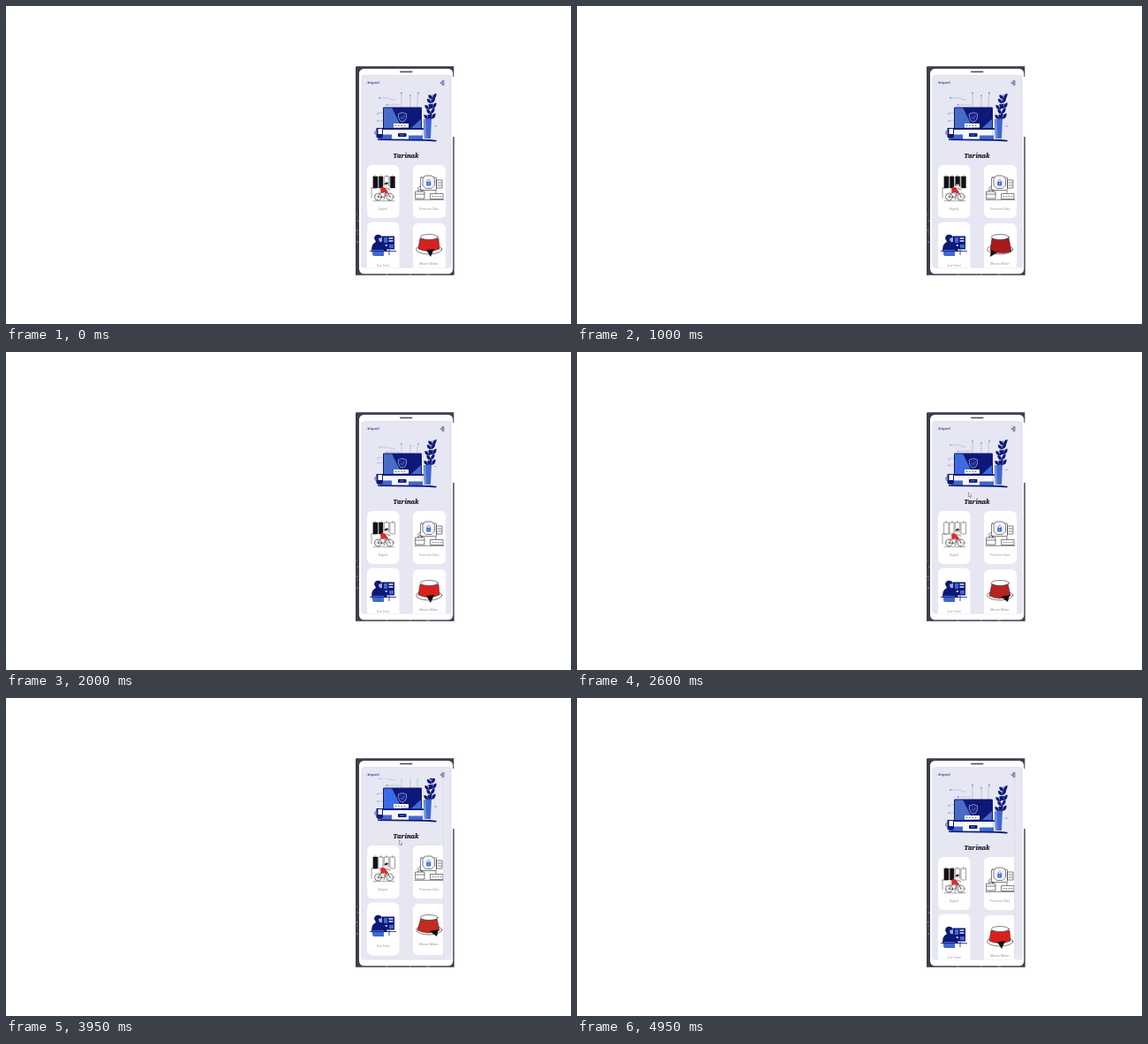
Write an HTML page that moves like this. It is 640x360 px and loops after 5 s.

```html
<!DOCTYPE html>
<html lang="en">
<head>
<meta charset="utf-8">
<title>Phone app</title>
<style>
html, body { margin: 0; width: 100%; height: 100%; overflow: hidden; background: #fff; }
svg { display: block; width: 100vw; height: 100vh; }
.anim { animation: 5s linear infinite; }
.title { font: italic 700 7px "Noto Serif", serif; fill: #15151d; stroke: #15151d; stroke-width: .2; text-anchor: middle; }
.hello { font: italic 700 4.3px "Liberation Serif", serif; fill: #34418c; }
.label { font: 3.5px Roboto, sans-serif; fill: #9a9aa2; text-anchor: middle; }
.card { fill: #fff; }
.ink { fill: none; stroke: #2b2b33; stroke-width: .6; stroke-linejoin: round; stroke-linecap: round; }
.paper { fill: #fff; }
.wire { fill: none; stroke: #959cbe; stroke-width: .5; }
.dot { fill: #8793c8; }
.navy { fill: #0d1878; }
.blue { fill: #4168cd; }

#page { animation-name: scroll; }
#bar { animation-name: bar; }
#cursor { animation-name: cursor; }
#wires { animation-name: grow; transform-origin: 452px 116px; }
#sheen { animation-name: sheen; }
.box { animation-timing-function: step-end; }
.b1 { animation-name: box1; } .b2 { animation-name: box2; }
.b3 { animation-name: box3; } .b4 { animation-name: box4; }
.spin { animation: spin 1.25s linear infinite; transform-box: fill-box; transform-origin: center; }
#rider { animation-name: bob; }
#crown { animation-name: crown; }
#tassel { animation-name: tassel; }

@keyframes scroll {
  0%, 56% { transform: none; animation-timing-function: ease-in-out; }
  64%, 87% { transform: translateY(-13px); animation-timing-function: ease-in-out; }
  95%, 100% { transform: none; }
}
@keyframes bar { 0%, 55% { opacity: 0; } 58%, 99% { opacity: 1; } 100% { opacity: 0; } }
@keyframes cursor {
  0%, 45% { opacity: 0; transform: translate(-3px, -4px); }
  48%, 54% { opacity: 1; transform: none; }
  64%, 88% { opacity: 1; transform: translate(2px, 2px); }
  94%, 100% { opacity: 0; transform: translate(2px, 2px); }
}
@keyframes grow {
  0%, 20%, 66%, 100% { transform: none; }
  40% { transform: scaleY(.68); }
  52% { transform: scaleY(.88); }
}
@keyframes sheen { 0%, 40%, 99%, 100% { fill: #496bc8; } 55%, 85% { fill: #3c6be6; } }
@keyframes box1 { 0% { opacity: 1; } 48% { opacity: 0; } 62%, 100% { opacity: 1; } }
@keyframes box2 { 0% { opacity: 1; } 45% { opacity: 0; } 86%, 100% { opacity: 1; } }
@keyframes box3 { 0% { opacity: 0; } 8% { opacity: 1; } 34%, 100% { opacity: 0; } }
@keyframes box4 { 0% { opacity: 1; } 38%, 100% { opacity: 0; } }
@keyframes spin { to { transform: rotate(360deg); } }
@keyframes bob {
  0%, 20%, 40%, 60%, 80%, 100% { transform: none; }
  10%, 30%, 50%, 70%, 90% { transform: translateY(.5px); }
}
@keyframes crown {
  0%, 40%, 97%, 100% { d: path("M469 263Q479 266 490 263L491 275Q479 280 467 275Z"); fill: #d8211d; }
  20% { d: path("M470 263Q479 267 489 262L492 278Q480 282 468 277Z"); fill: #a9191c; }
  52% { d: path("M470 262Q479 266 488 262L491 276Q479 282 467 276Z"); fill: #b7251f; }
  69%, 79% { d: path("M470 262Q479 266 488 262L491 276Q479 282 466 276Z"); fill: #c42b22; }
}
@keyframes tassel {
  0%, 40%, 97%, 100% { d: path("M476 276L485 275L481 284Z"); }
  20% { d: path("M469 276L476 279L468 284Z"); }
  52%, 79% { d: path("M480 277L490 275L488 283Z"); }
}
</style>
</head>
<body>
<svg viewBox="0 0 640 360">
  <defs>
    <clipPath id="view"><rect x="403" y="91" width="101" height="204.5"/></clipPath>
    <clipPath id="screen"><rect x="428" y="115.5" width="42" height="23"/></clipPath>
    <g id="wheel">
      <circle class="ink paper" r="4"/>
      <path class="spin ink" style="stroke-width:.25" d="M-4 0H4M0-4V4"/>
    </g>
    <path id="leaf" class="navy" d="M0 0Q-5 0-4.6-5Q0-5 0 0Q5-1 4.6-6.5Q0-6 0 0Z"/>
  </defs>

  <!-- phone body -->
  <path fill="#3b3e4c" d="M397 68.3H507.3V80H506V148H507.7V304.7H396V69Z"/>
  <rect x="400" y="71" width="106.3" height="232.3" rx="5.5" fill="#fff"/>
  <rect x="402.8" y="78.5" width="101.4" height="217.5" rx="3" fill="#e6e7f3" stroke="#cfd0dd" stroke-width=".5"/>
  <rect x="446" y="73.7" width="14.5" height="1.5" rx=".7" fill="#4a4a50"/>
  <path d="M397 236h1M398 243h1.5M396.5 254h2M397.5 258h1M397 267h2M430 304h3M457 304h2M476 304h4" stroke="#aeb3c3" stroke-width=".8"/>

  <g clip-path="url(#view)">
    <g id="page" class="anim">
      <!-- laptop scene -->
      <g id="wires" class="anim">
        <path class="wire" d="M448 115V99M458 115V102M466 115V106L467 99M446 112H432M441 106H436L434 104H423"/>
        <path class="wire" d="M427 121H421M427 130H421M484 136H487"/>
        <g class="dot">
          <circle cx="448" cy="98.5" r="1"/><circle cx="458" cy="101.5" r="1"/>
          <circle cx="467" cy="98.5" r="1"/><circle cx="431.5" cy="112" r=".9"/>
          <circle cx="423" cy="104" r=".9"/><circle cx="421" cy="122" r=".8"/>
          <circle cx="421" cy="130" r=".8"/><circle cx="487" cy="136" r=".8"/>
        </g>
      </g>
      <path class="wire" d="M478 129Q479 114 483 100" style="stroke:#0d1878"/>
      <use href="#leaf" x="478" y="128"/><use href="#leaf" x="482" y="128"/>
      <use href="#leaf" x="481" y="122"/><use href="#leaf" x="479" y="117"/>
      <use href="#leaf" x="483" y="116"/><use href="#leaf" x="481.5" y="110"/>
      <use href="#leaf" x="483" y="105.5"/>
      <path class="blue" d="M473 128H482L481 150H474Z"/>
      <path fill="#6d8be0" d="M473 128H475.5L476.5 150H474Z"/>
      <rect class="navy" x="427" y="114.5" width="44" height="25" rx="1.3"/>
      <g clip-path="url(#screen)">
        <path id="sheen" class="anim" d="M428 115H437L449 139H428ZM470 128V139H458Z"/>
      </g>
      <path fill="#17258b" stroke="#c5cef4" stroke-width=".6" d="M449 120.5L453.6 122V126Q453 130 449 131.5Q445 130 444.4 126V122Z"/>
      <path d="M447 126L448.6 127.7L451.5 124" fill="none" stroke="#acbafa" stroke-width=".5"/>
      <rect x="439" y="133" width="17" height="4.6" fill="#fff"/>
      <path d="M441 135.4H454" stroke="#30377a" stroke-width="1" stroke-dasharray="1.3 2"/>
      <path class="navy" d="M424 138.3H473V140H424Z"/>
      <path fill="#f7f8ff" d="M427 140H470V150H427Z"/>
      <path class="blue" d="M424 145.5H437V151H424ZM456 146.5H472V151H456Z"/>
      <rect class="navy" x="444" y="144" width="9.5" height="4" rx=".7"/>
      <path d="M446 146H451" stroke="#91a8ef" stroke-width=".7"/>
      <path class="navy" d="M419.5 138H427V148Q426 150 423 150Q420 150 419.5 148Z"/>
      <path fill="#fff" d="M421.5 139H426V145H421.5Z"/>
      <path d="M419.5 141Q416 143 419.5 146" fill="none" stroke="#0d1878" stroke-width=".8"/>
      <path class="navy" d="M421 150.6L480 151L488 152L487 153.4L476 152.8L421 152Z"/>

      <text class="title" x="453" y="172">Tarinak</text>

      <rect class="card" x="409" y="180" width="36.5" height="60" rx="6"/>
      <rect class="card" x="461" y="180" width="37" height="60" rx="6"/>
      <rect class="card" x="409" y="244.5" width="36.5" height="60" rx="6"/>
      <rect class="card" x="461" y="246" width="37" height="58" rx="6"/>

      <!-- cyclist -->
      <g class="ink" style="stroke-width:.45">
        <path d="M416 193H421V206H416ZM422.3 193H427V206H422.3ZM428.7 193H433.7V206H428.7ZM435.3 193H440.5V206H435.3Z"/>
        <path d="M418 193V191.5M425 193V191.5M431 193V191.5M438 193V191.5M414 206V217M414 206H419"/>
      </g>
      <g fill="#111116">
        <rect class="anim box b1" x="416" y="193" width="5" height="13"/>
        <rect class="anim box b2" x="422.3" y="193" width="4.7" height="13"/>
        <rect class="anim box b3" x="428.7" y="193" width="5" height="13"/>
        <rect class="anim box b4" x="435.3" y="193" width="5.2" height="13"/>
      </g>
      <path class="ink" style="stroke-width:.4" d="M416 220.7H440"/>
      <use href="#wheel" x="421.5" y="216"/><use href="#wheel" x="434.8" y="216"/>
      <path class="ink" d="M421.5 216L425 210H432L428 216ZM432 210L434.8 216M431 207H434"/>
      <g id="rider" class="anim">
        <path fill="#fff" d="M427 204L432 203L436 207L431 208Z"/>
        <path fill="#d72d2a" d="M424 207L426 204.5L430 206L432.5 211L430.5 213L428 210.5L425 212.5Z"/>
        <path class="ink" d="M427 211L430 214L428 219M431 206L435 208"/>
        <circle cx="431" cy="202.3" r="1.6" fill="#f1c5b0"/>
        <path fill="#17171c" d="M428.7 202Q429 199 432 199.5L433.4 201L430.4 202Z"/>
      </g>
      <text class="label" x="427" y="231">Digital</text>

      <!-- secure workplace -->
      <g class="ink">
        <rect class="paper" x="469.5" y="194" width="18" height="14.5" rx="1"/>
        <path fill="#f1f3fc" d="M475.5 192H482L485.5 195.5V203L482 206.5H475.5L472 203V195.5Z"/>
        <rect class="paper" x="488" y="197" width="6" height="9"/>
        <path d="M489 200H493M489 203H493M466 207L469 204M471 209V213M487 209V212"/>
        <rect class="paper" x="464" y="210" width="10" height="8"/>
        <path d="M464 213H474M467 210V208H471V210M463 219.3H496"/>
        <rect class="paper" x="481" y="212.5" width="14" height="6"/>
        <path d="M483 215.5H493" stroke-dasharray="1 2"/>
      </g>
      <path d="M477 199.5V198Q478.8 195 480.5 198V199.5" fill="none" stroke="#3d63bd" stroke-width=".8"/>
      <rect x="476.2" y="199" width="5" height="4.4" rx=".7" fill="#426fce"/>
      <circle cx="478.7" cy="201.1" r=".6" fill="#fff"/>
      <text class="label" x="479.3" y="231">Premium Data</text>

      <!-- desk worker -->
      <rect class="navy" x="426" y="260.5" width="14" height="15"/>
      <path class="blue" d="M428 262H432V268H428ZM434 270H439V274H434Z"/>
      <path d="M433.5 263H438.5M433.5 266H438.5M428 271H432" stroke="#e6eaff" stroke-width="1.4"/>
      <path class="navy" d="M414 277Q414 269 419 267L417 263Q418 258 423 259Q427 260 426 265L429 269L432 278H414Z"/>
      <path fill="#9aabdf" d="M422 263L426 262L426 267Q422 268 422 263Z"/>
      <path class="blue" d="M415 276H428V283H417Q415 283 415 280Z"/>
      <path d="M412 277.5H442M434 276V282" stroke="#0d1878" stroke-width=".8"/>
      <text class="label" x="427" y="295">Live Feed</text>

      <!-- hat -->
      <ellipse class="ink paper" cx="479.2" cy="275.5" rx="14.6" ry="5.5"/>
      <path id="crown" class="anim" d="M469 263Q479 266 490 263L491 275Q479 280 467 275Z" stroke="#34191a" stroke-width=".5"/>
      <ellipse class="ink paper" cx="479.3" cy="261.5" rx="10" ry="3"/>
      <path id="tassel" class="anim" fill="#111116" d="M476 276L485 275L481 284Z"/>
      <text class="label" x="479" y="293">Master Maker</text>
    </g>
    <g id="bar" class="anim">
      <rect x="495.5" y="91" width="3" height="204.5" fill="#e9eaf4"/>
      <path d="M495.8 91V296" stroke="#cfd0dc" stroke-width=".6"/>
    </g>
  </g>

  <text class="hello" x="408.5" y="88.3">Arigato!</text>
  <path d="M493.5 85H496.5M491.7 87H496.5M493.5 89H496.5" stroke="#2b3878" stroke-width="1"/>
  <path id="cursor" class="anim" d="M443.5 159V164L444.7 163L445.5 165L446.3 164.6L445.5 162.8H447Z" fill="#fff" stroke="#555" stroke-width=".5"/>
</svg>
</body>
</html>
```
